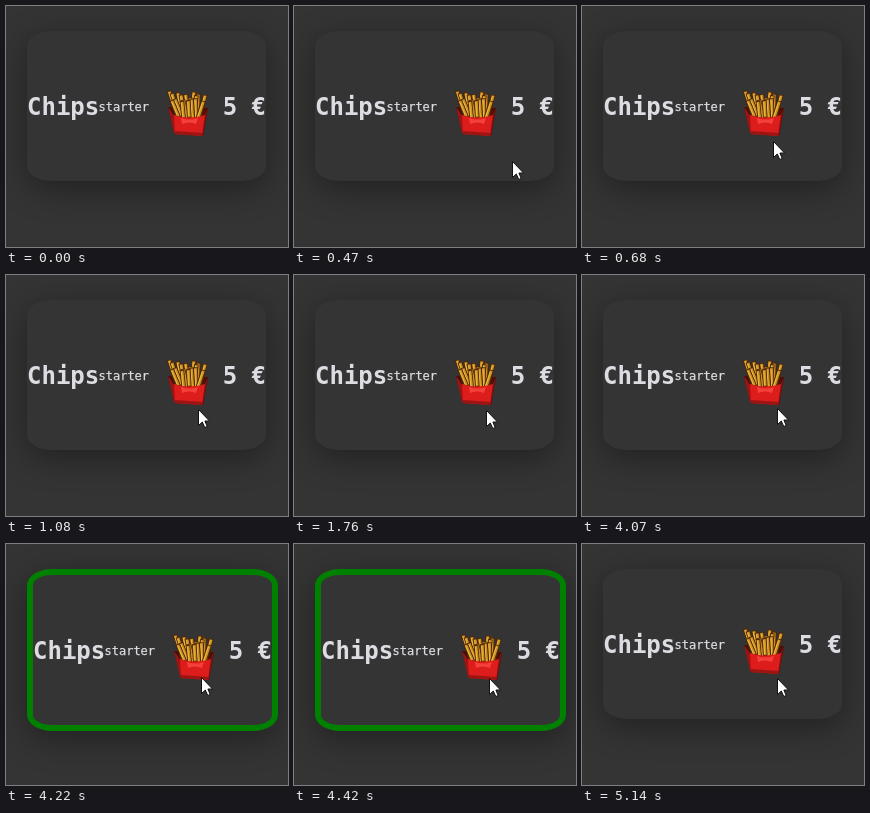
An HTML page that plays this animation: 282x241 px, repeating every 7120 ms.

```html
<!DOCTYPE html>
<html lang="en">
<head>
<meta charset="utf-8">
<title>Menu card</title>
<style>
html, body { margin: 0; width: 100%; height: 100%; overflow: hidden; background: #343434; }
#card {
  position: absolute; left: 21px; top: 25px; width: 239px; height: 150px;
  border-radius: 10%; background: #343434;
  box-shadow: 0 8px 32px rgba(0, 0, 0, .37);
}
#card.active { border: 6px solid green; }
svg { position: absolute; left: 0; top: 0; width: 282px; height: 241px; }
text { font-family: "DejaVu Sans Mono", monospace; fill: #dcdde2; }
.big { font-size: 24px; font-weight: bold; }
.small { font-size: 12px; stroke: #dcdde2; stroke-width: .25px; }
</style>
</head>
<body>
<div id="card"></div>
<svg viewBox="0 0 282 241">
  <g id="content">
    <text class="big" x="21" y="109">Chips</text>
    <text class="small" x="92.5" y="105">starter</text>
    <text class="big" x="260" y="109" text-anchor="end">5 €</text>
    <path d="M162 101 L202 102 L197 130 L169 128Z" fill="#4a1009"/>
    <g id="fries"></g>
    <path d="M162 101 L169 111 L171 129 L168 127Z" fill="#9c1512"/>
    <path d="M202 102 L197 111 L195 129 L197 130Z" fill="#7c100e"/>
    <path d="M168 109 Q183 114 199 109 L196 130 L169 128Z" fill="#dc1d1c"/>
    <path d="M175 112 Q183 115 192 112 L190 118 Q183 115 176 118Z" fill="#f4403a"/>
    <path d="M169 125 L197 127 L196 130 L169 128Z" fill="#9c1512"/>
  </g>
  <path id="pointer" d="M.5 .5 V16.500 L4.300 13 L6.800 18.500 L9.200 17.500 L6.900 12 H11.500Z"
    fill="#fff" stroke="#111" stroke-linejoin="round"/>
</svg>
<script>
const LOOP = 7120, ENTER = 330, STEP = 70;
const $ = id => document.getElementById(id);
const card = $("card"), content = $("content"), pointer = $("pointer");

let seed = 11;
const random = () => (seed = seed * 16807 % 2147483647) / 2147483647;

// A fan of fries, the back ones tallest
function fry(i, count) {
  const depth = i / count, spread = (i * 0.618) % 1;
  const foot = [171 + 24 * spread, 109 + 2 * random()];
  const head = [164 + 35 * spread + 6 * (random() - .5), 86 + 11 * depth + 3 * random()];
  const line = (color, width, dx = 0) =>
    `<path d="M${foot[0] + dx} ${foot[1]} L${head[0] + dx} ${head[1]}" stroke="${color}" stroke-width="${width}" stroke-linecap="square"/>`;
  return line("#4a270a", 4.6) + line("#cf9020", 2.8) + line("#edbb45", 1, -.6);
}
$("fries").innerHTML = Array.from({ length: 18 }, (_, i) => fry(i, 18)).join("");

// The pointer glides in by steps, slowing down, then drifts a little
const nudges = [[1010, 1, -1], [1760, 0, 1], [3340, 2, -1], [3410, 1, 0], [4070, 0, -1], [4420, 0, 1]];
function pointerAt(t) {
  const left = 1 - Math.min(5, Math.floor((t - ENTER) / STEP)) / 5;
  let x = 191 + Math.round(75 * left ** 2), y = 135 + Math.round(56 * left ** 2);
  for (const [at, dx, dy] of nudges) if (t >= at) { x += dx; y += dy; }
  return [x, y];
}

function draw(t) {
  pointer.style.display = t < ENTER ? "none" : "";
  pointer.setAttribute("transform", `translate(${pointerAt(t)})`);
  const active = t >= 4220 && t < 5140;
  card.className = active ? "active" : "";
  content.setAttribute("transform", active ? "translate(6 6)" : "");
}

const start = performance.now();
function tick() {
  draw((performance.now() - start) % LOOP);
  requestAnimationFrame(tick);
}
tick();
</script>
</body>
</html>
```
